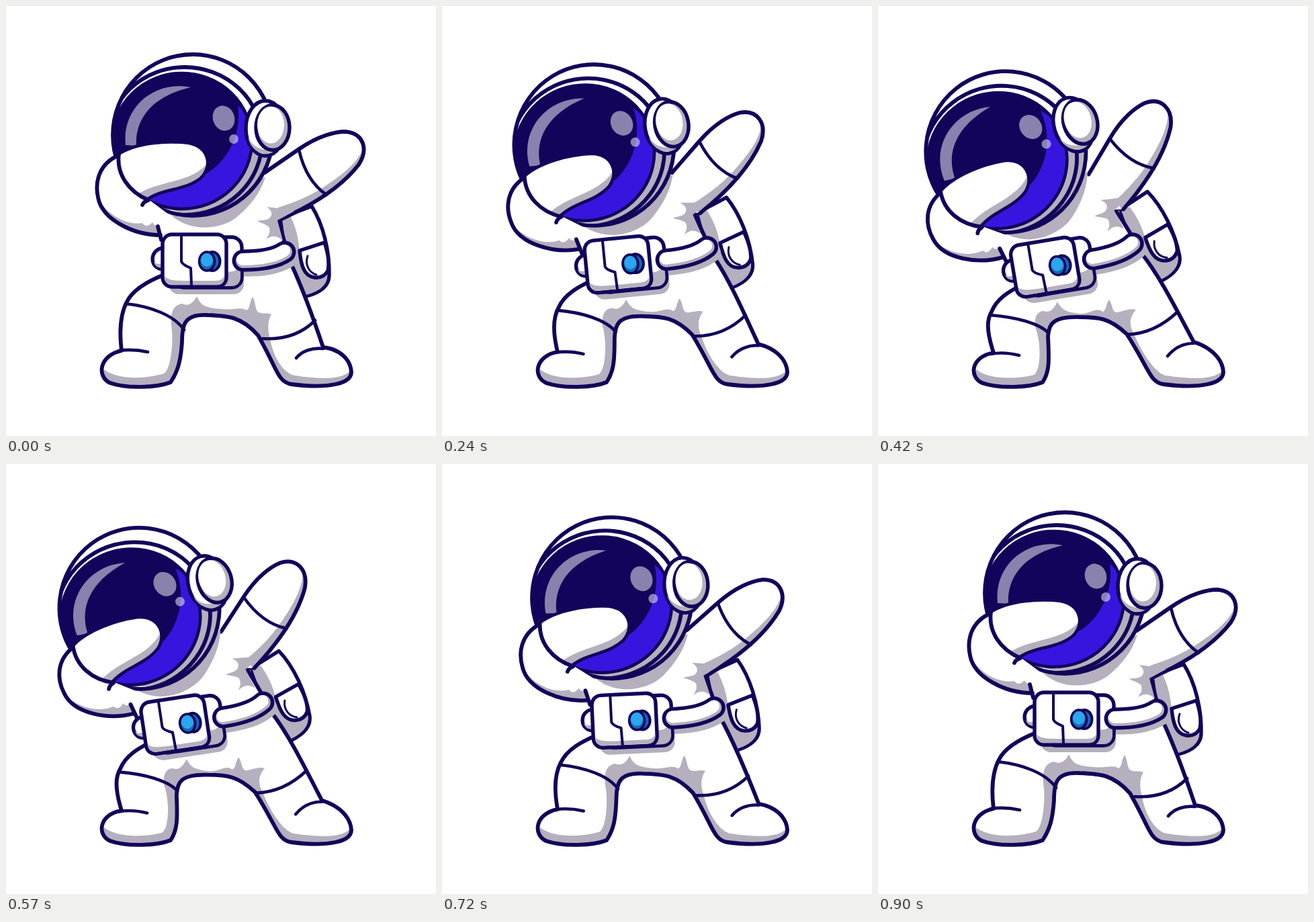
Animation, 640 px wide and 640 px high, one loop 0.93 s. Source, as an HTML page:

```html
<!DOCTYPE html>
<html lang="en">
<head>
<meta charset="utf-8">
<title>Dabbing astronaut</title>
<style>
  html, body { margin: 0; width: 100%; height: 100%; overflow: hidden; background: #fff; }
  svg { display: block; width: 100vw; height: 100vh; }
  svg * { stroke-linecap: round; stroke-linejoin: round; }
  .ink { fill: #fff; stroke: #11045a; stroke-width: 5.4; }
  .line { fill: none; stroke: #11045a; stroke-width: 4.6; }
  .edge { fill: none; stroke: #11045a; stroke-width: 5.8; }
  .shade { fill: #b6afbd; }
  .white { fill: #fff; }
  .glow { fill: #fff; opacity: .5; }
</style>
</head>
<body>
<!-- data-to holds the second pose of d or transform -->
<svg viewBox="0 0 640 640">
  <clipPath id="shell"><ellipse cx="278" cy="192" rx="119" ry="120"/></clipPath>
  <clipPath id="glass"><ellipse cx="262" cy="201" rx="104" ry="101"/></clipPath>

  <g id="backpack" transform="translate(0 0) rotate(0 457 377)" data-to="translate(-37 -24) rotate(-12.5 457 377)">
    <path class="ink" d="M410 315L455 298C472 325 482 365 481 402C480 420 462 428 447 432L420 380Z"/>
    <path class="shade" d="M411 318L424 314C434 335 437 355 437 375C439 400 450 408 478 397C480 418 462 426 447 430L420 380Z"/>
    <path class="ink" d="M437 364L474 352C480 370 481 385 479 394C474 403 467 405 459 404C443 402 439 385 437 364Z"/>
    <path class="line" style="stroke-width:3" d="M449 372C444 386 452 397 462 400"/>
  </g>

  <g id="body">
    <path class="white" d="M412 316L406 318L425 385L462 470L472 508L410 562L375 490L300 460L226 327Z"
      data-to="M366 298L353 303L392 368L445 457L470 500L410 562L370 488L300 463L181 360Z"/>
    <path class="shade"
      d="M246 475C244 455 250 445 262 443C270 447 278 444 284 432C290 445 294 449 320 451C340 453 350 447 358 453C364 450 362 440 367 433C372 440 370 452 376 456C384 459 390 456 395 459C388 470 390 485 393 495C398 525 415 548 430 550C470 556 500 556 512 543C514 562 480 570 425 563C404 560 404 540 375 490C350 462 330 461 300 460C265 458 262 475 262 500C260 530 255 545 245 560C225 568 180 570 155 561C145 556 144 548 146 541C165 556 205 556 235 547C245 542 250 500 246 475Z"
      data-to="M234 478C232 463 237 454 247 454C254 457 261 453 267 440C273 451 277 455 300 458C315 459 325 447 334 455C340 454 339 443 344 437C349 444 348 454 354 456C362 456 373 449 384 452C374 463 373 475 381 488C392 515 412 546 428 550C470 556 500 556 512 543C514 562 480 570 425 563C404 560 404 540 370 488C345 465 330 463 300 463C258 462 254 475 253 492C255 530 255 545 245 560C225 568 180 570 155 561C145 556 144 548 146 541C165 556 205 556 232 549C243 542 243 500 234 478Z"/>
    <path class="edge"
      d="M412 316L406 318C412 345 418 365 425 385C440 418 456 460 472 508C495 510 513 525 514 545C514 562 480 570 425 563C404 560 404 540 375 490C350 462 330 461 300 460C265 458 262 475 262 500C260 530 255 545 245 560C225 568 180 570 155 561C135 552 138 520 172 513C168 480 172 455 180 440C190 420 215 408 235 400"
      data-to="M366 298L353 303C368 325 380 345 392 368C420 403 442 448 470 500C495 508 513 525 514 545C514 562 480 570 425 563C404 560 404 540 370 488C345 465 330 463 300 463C258 462 254 475 253 492C255 530 255 545 245 560C225 568 180 570 155 561C135 552 138 522 172 516C160 480 163 465 169 455C177 435 195 425 214 415"/>
    <path class="line"
      d="M178 443C215 447 250 460 265 482M382 495C415 497 440 488 460 468M168 513C183 511 198 512 211 515M432 524C440 514 455 508 472 510"
      data-to="M167 460C205 463 240 472 254 487M371 489C400 488 425 475 446 455M168 518C183 515 198 517 210 520M431 521C441 509 455 502 470 502"/>
  </g>

  <g id="arm" transform="translate(0 0) rotate(0 406 318)" data-to="translate(-44 -13) rotate(-25 406 318)">
    <path class="white" d="M385 248L436 213C465 193 490 187 505 187C532 189 540 213 525 236C505 262 470 290 410 317L370 300Z"/>
    <path class="shade" d="M531 212C525 232 500 252 472 270C450 284 430 292 405 300L408 318C470 290 505 262 525 236Z"/>
    <path class="edge" d="M385 248L436 213C465 193 490 187 505 187C532 189 540 213 525 236C505 262 470 290 410 317"/>
    <path class="line" d="M436 214C443 245 458 268 477 281"/>
  </g>
  <g id="crease" transform="translate(0 0) rotate(0 406 318)" data-to="translate(-53 -15) rotate(-14 406 318)">
    <path class="shade" d="M428 302C415 304 402 300 388 299C398 306 396 312 392 316C386 320 380 318 374 320C382 324 390 326 392 330C394 338 390 342 387 347C398 340 404 342 412 349L404 319L428 306Z"/>
  </g>

  <g id="head" transform="translate(0 0) rotate(0 324 167)" data-to="translate(-97 13) rotate(-16.7 324 167)">
    <path class="shade" d="M236 300C262 338 318 336 345 313C362 298 378 280 386 255Z"/>
    <ellipse class="white" cx="278" cy="192" rx="119" ry="120"/>
    <g clip-path="url(#shell)">
      <path class="shade" d="M366 215C360 270 310 308 235 300L300 320L400 280L400 200Z"/>
      <ellipse class="edge" cx="266" cy="201" rx="115" ry="110"/>
      <ellipse cx="262" cy="201" rx="104" ry="101" fill="#11045a"/>
      <g clip-path="url(#glass)">
        <path fill="#3715df" d="M345 148C352 195 325 235 297 250L205 290C250 320 400 310 375 180Z"/>
      </g>
      <ellipse class="line" cx="262" cy="201" rx="104" ry="101"/>
    </g>
    <ellipse class="edge" cx="278" cy="192" rx="119" ry="120"/>
    <path class="glow" d="M275 121C222 110 172 150 178 207L194 208C192 170 215 135 275 121Z"/>
    <ellipse class="glow" cx="324" cy="167" rx="16" ry="19" transform="rotate(-20 324 167)"/>
    <circle class="glow" cx="339" cy="198" r="7"/>

    <path class="white" d="M168 222C138 235 132 262 137 285C143 318 190 341 232 341L242 310L215 290C185 280 164 250 168 222Z"/>
    <path class="shade" d="M140 292C160 318 185 326 203 323C207 329 212 328 218 322C221 328 224 326 227 328L230 341C190 341 146 320 140 292Z"/>
    <path class="edge" d="M168 222C138 235 132 262 137 285C143 318 190 341 230 341"/>
    <path class="white" d="M168 220C195 203 240 200 272 204C302 210 308 238 290 256C265 276 235 270 208 289C185 280 164 250 168 220Z"/>
    <path class="shade" d="M194 281C230 258 272 265 299 235C300 245 296 252 290 256C265 276 235 270 208 289Z"/>
    <path class="line" d="M168 220C195 203 240 200 272 204C302 210 308 238 290 256C265 276 235 270 208 289"/>
    <path class="edge" d="M168 220C164 250 182 276 212 289Q205 291 203 296"/>

    <ellipse class="ink" cx="386" cy="182" rx="29" ry="41"/>
    <path class="shade" d="M360 195C368 212 383 216 402 214C392 225 366 222 360 195Z"/>
    <ellipse class="ink" style="fill:#b6afbd" cx="397" cy="181" rx="25" ry="33.5"/>
    <ellipse class="white" cx="394" cy="177" rx="20" ry="27.5"/>
  </g>
  <path class="edge" d="M226 328L231 348" data-to="M181 361L193 385"/>

  <g id="pack" transform="translate(0 0) rotate(0 291 379)" data-to="translate(-32 8) rotate(-9.5 291 379)">
    <rect class="shade" x="242" y="360" width="112" height="69" rx="15"/>
    <path d="M354 388C380 388 402 386 420 375" fill="none" stroke="#b6afbd" stroke-width="29"/>
    <path class="ink" d="M235 360C213 361 212 392 235 392"/>
    <path class="shade" d="M220 380C224 386 230 384 234 382V390C226 390 221 387 220 380Z"/>
    <rect class="ink" x="250" y="344" width="101" height="75" rx="15"/>
    <path class="shade" d="M328 395C336 397 345 393 349 388V405C348 414 342 417 335 417H318Z"/>
    <rect class="ink" x="233" y="340" width="95" height="78" rx="14"/>
    <path class="shade" d="M236 402C241 408 250 409 270 409H310C320 409 324 406 325 400C326 410 323 415 314 415H248C240 415 236 410 236 402Z"/>
    <path class="line" style="stroke-width:4" d="M261 342V380Q262 385 275 390L276 415"/>
    <ellipse cx="307" cy="380" rx="11.5" ry="14" fill="#1767b5" stroke="#11045a" stroke-width="4"/>
    <ellipse cx="299" cy="380" rx="11.5" ry="14" fill="#1767b5" stroke="#11045a" stroke-width="3.5"/>
    <ellipse cx="299" cy="378" rx="9" ry="10" fill="#2aa7ee"/>
    <g fill="none">
      <path d="M353 379C378 379 400 376 415 366" stroke="#11045a" stroke-width="33"/>
      <path d="M353 379C378 379 400 376 415 366" stroke="#b6afbd" stroke-width="22"/>
      <path d="M352 377C377 377 399 374 414 364" stroke="#fff" stroke-width="18"/>
    </g>
  </g>
</svg>
<script>
  const LOOP = 930, STEP = 30, PEAK = 450, POWER = 2.6;
  const number = /-?\d+(\.\d+)?/g;

  const parts = [...document.querySelectorAll('[data-to]')].map(el => {
    const attr = el.hasAttribute('d') ? 'd' : 'transform';
    return { el, attr, from: el.getAttribute(attr), to: el.dataset.to.match(number).map(Number) };
  });

  const ease = k => k < .5 ? (2 * k) ** POWER / 2 : 1 - (2 - 2 * k) ** POWER / 2;

  function draw(now) {
    const time = Math.floor(now % LOOP / STEP) * STEP;
    const lean = ease(1 - Math.abs(time - PEAK) / PEAK);
    for (const { el, attr, from, to } of parts) {
      let i = 0;
      el.setAttribute(attr, from.replace(number, n => (+n + (to[i++] - n) * lean).toFixed(2)));
    }
  }

  const start = performance.now();
  function tick() {
    draw(performance.now() - start);
    requestAnimationFrame(tick);
  }
  tick();
</script>
</body>
</html>
```
